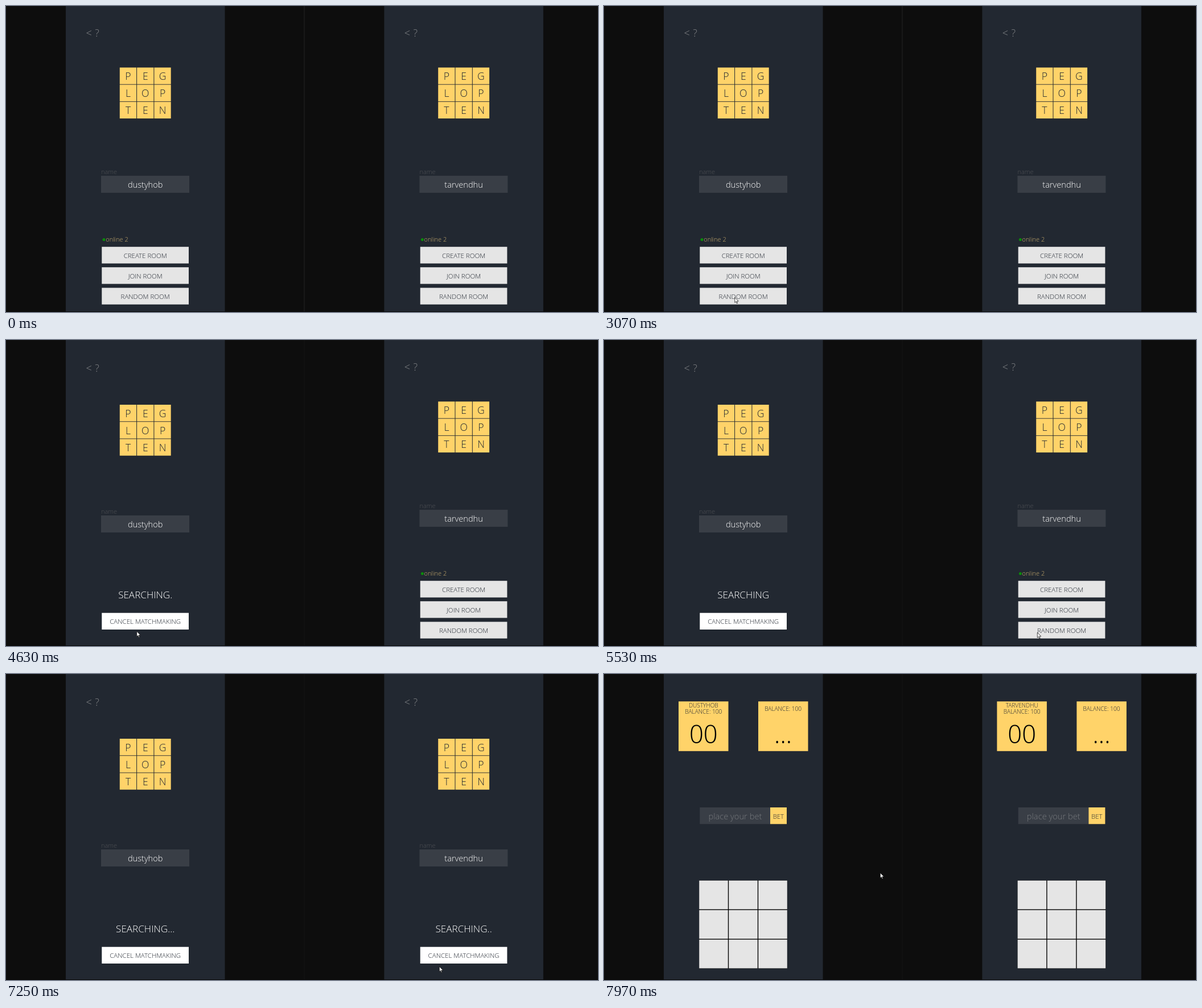
An HTML page for the animation above (8 s loop, 1040x539 px).

```html
<!DOCTYPE html>
<html lang="en">
<head>
<meta charset="utf-8">
<title>Two player lobby</title>
<style>
  html, body { margin: 0; width: 100%; height: 100%; overflow: hidden; background: #0d0d0d; }
  svg { display: block; width: 1040px; height: 539px; }
  text { font-family: "Open Sans", "Noto Sans", sans-serif; font-weight: 300; white-space: pre; }
</style>
</head>
<body>
<svg id="stage" viewBox="0 0 1040 539" xmlns="http://www.w3.org/2000/svg"></svg>
<script>
const LOOP = 8000;
const NAVY = '#222831', SLATE = '#393e46', YELLOW = '#ffd369', PALE = '#e5e5e5';
const MID = 244.7;                 // centre line of the left phone panel
const RIGHT_SHIFT = 559.4;
const TITLE = 'PEGLOPTEN';
const stage = document.getElementById('stage');

const rect = (x, y, w, h, fill) =>
  `<rect x="${x}" y="${y}" width="${w}" height="${h}" fill="${fill}"/>`;
const text = (str, x, y, size, fill, anchor = 'middle') =>
  `<text x="${x}" y="${y}" font-size="${size}" fill="${fill}" text-anchor="${anchor}">${str}</text>`;
const button = (label, y, fill) =>
  rect(168.3, y, 152.7, 29.3, fill) + text(label, MID, y + 19.7, 11.5, NAVY);
const grid = draw =>
  Array.from({ length: 9 }, (_, i) => draw(i % 3, Math.floor(i / 3), i)).join('');

// Header, title tiles and name field, shared by the lobby and the search screen
function header(name, searching) {
  const top = searching ? 114 : 108.4;
  const field = searching ? 309 : 299;
  const nav = searching ? 56 : 54.3;
  return text('&lt;', 145.6, nav, 18, '#858789') + text('?', 160, nav, 18, '#858789') +
    grid((col, row, i) => {
      const x = 199.8 + col * 30.3, y = top + row * 30.2;
      return rect(x, y, 29.3, 29.3, YELLOW) + text(TITLE[i], x + 14.7, y + 21.6, 17.6, NAVY);
    }) +
    text('name', 167, field - 3, 11, '#505256', 'start') +
    rect(167, field, 155, 30, SLATE) +
    text(name, MID, field + 21.3, 14.6, '#fff');
}

function lobby(name, confirmFill) {
  return header(name, false) +
    '<circle cx="172" cy="411.6" r="2.5" fill="#0b8a0b"/>' +
    text('online 2', 175.2, 415, 11, '#cdb070', 'start') +
    button('CREATE ROOM', 424.2, PALE) +
    button('JOIN ROOM', 460.2, PALE) +
    button(confirmFill ? 'CONFIRM ?' : 'RANDOM ROOM', 496.4, confirmFill || PALE);
}

function search(name, dots) {
  return header(name, true) +
    text('SEARCHING' + '.'.repeat(dots), MID, 455, 17.1, '#fff') +
    button('CANCEL MATCHMAKING', 480.7, '#fff');
}

function game(name) {
  const card = x => rect(x, 48.3, 87.5, 87.5, YELLOW);
  return card(131) + card(271) +
    text(name.toUpperCase(), 174.8, 58.6, 10.1, NAVY) +
    text('BALANCE: 100', 174.8, 70.2, 10.1, NAVY) +
    text('00', 174.8, 122, 43.5, '#000') +
    text('BALANCE: 100', 314.6, 65.4, 10.1, NAVY) +
    text('...', 314.6, 122, 43.5, '#000') +
    rect(168.3, 235, 124, 29.3, SLATE) +
    text('place your bet', 230.4, 256, 14.7, '#777a7e') +
    rect(292, 235, 29, 29.3, YELLOW) +
    text('BET', 306.4, 254.6, 11.4, NAVY) +
    rect(167, 363.6, 155, 155, '#000') +
    grid((col, row) => rect(167.2 + col * 52, 363.8 + row * 52, 50.6, 50.6, PALE));
}

// Value of the last [time, value] entry already reached
function at(t, track) {
  let value = null;
  for (const [start, v] of track) if (t >= start) value = v;
  return value;
}

const PLAYERS = [
  { name: 'dustyhob', x: 0, ask: 3770, confirm: 3850, search: 4560,
    dots: [[4560, 1], [4870, 2], [5230, 3], [5530, 0], [5780, 1], [5990, 2],
           [6240, 3], [6470, 0], [6640, 1], [6790, 2], [7040, 3]] },
  { name: 'tarvendhu', x: RIGHT_SHIFT, ask: 5780, confirm: 5840, search: 6870,
    dots: [[6870, 1], [7100, 2]] }
];
const GAME_START = 7340;

function screen(player, t) {
  if (t >= GAME_START) return game(player.name);
  if (t >= player.search) return search(player.name, at(t, player.dots));
  return lobby(player.name, at(t, [[player.ask, '#f2dca7'], [player.confirm, YELLOW]]));
}

// Stepped pointer moves along a quadratic curve; "until" hides the pointer again
const MOVES = [
  { start: 500, end: 728, steps: 3, until: 730, path: [[1034, 536], [1026, 534], [1024, 534]] },
  { start: 1910, end: 1911, steps: 1, until: 1990, path: [[254, 465], [254, 465], [254, 465]] },
  { start: 2370, end: 3070, steps: 9, until: LOOP, path: [[67, 366], [104, 442], [229.5, 513]] },
  { start: 4720, end: 5300, steps: 8, until: LOOP, path: [[262, 513], [510, 514], [761, 515]] },
  { start: 7800, end: 7970, steps: 2, until: LOOP, path: [[690, 495], [538, 407], [485, 350]] }
];

function pointer(t) {
  const move = at(t, MOVES.map(m => [m.start, m]));
  if (!move || t >= move.until) return '';
  const done = Math.min(1, (t - move.start) / (move.end - move.start));
  const p = Math.floor(done * move.steps + 1e-6) / move.steps;
  const e = p * p * (3 - 2 * p);
  const [a, b, c] = move.path;
  const [x, y] = [0, 1].map(k =>
    ((1 - e) ** 2 * a[k] + 2 * e * (1 - e) * b[k] + e * e * c[k]).toFixed(1));
  return `<path transform="translate(${x} ${y})" d="M.3 .3V9.4L2.3 7.5 3.8 11 5.2 10.4 3.7 7H6.8Z"
    fill="#fff" stroke="#000" stroke-width=".7"/>`;
}

function picture(t) {
  const divider = t < 4560 ? '#252525' : '#151515';
  return rect(0, 0, 1040, 539, '#0d0d0d') + rect(523.5, 0, 1, 539, divider) +
    PLAYERS.map(p => `<g transform="translate(${p.x})">` +
      rect(105, 0, 279.5, 539, NAVY) + screen(p, t) + '</g>').join('') +
    rect(0, 538, 1040, 1, '#070708') + pointer(t);
}

let shown = '';
function render(now) {
  const next = picture(now % LOOP);
  if (next !== shown) stage.innerHTML = shown = next;
  requestAnimationFrame(render);
}
render(performance.now());
</script>
</body>
</html>
```
